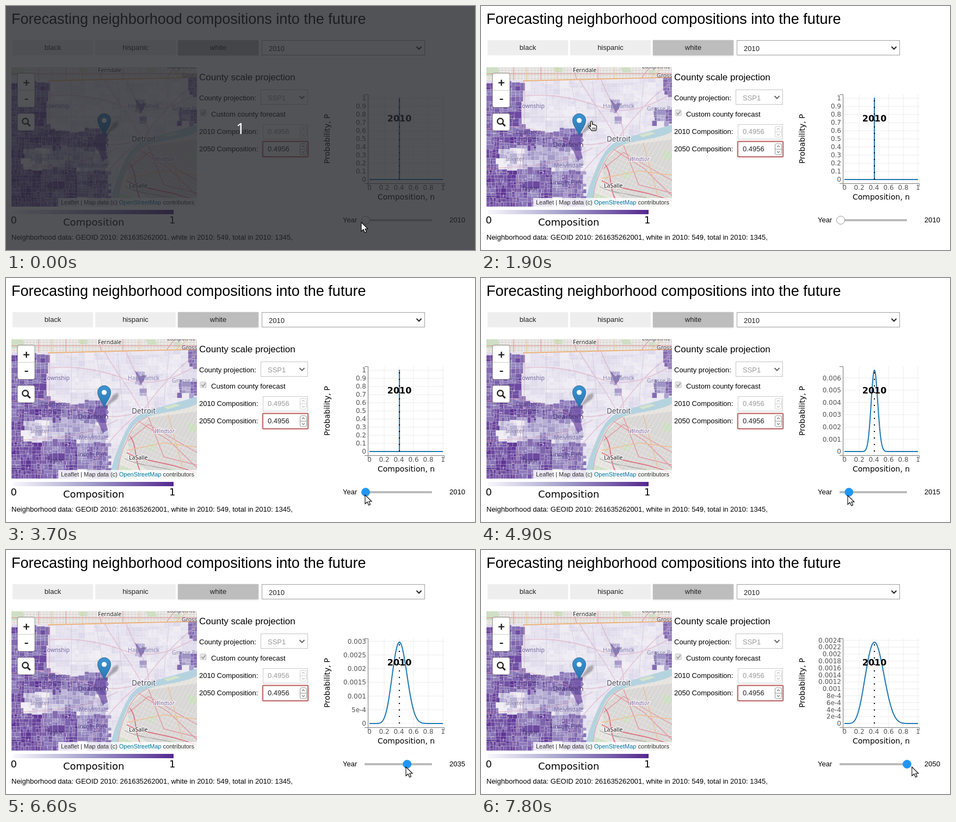
Recreate the animation shown at these times as an HTML page. Size 862 px wide and 450 px high, loop 8000 ms.

```html
<!DOCTYPE html>
<html lang="en">
<head>
<meta charset="utf-8">
<title>Forecasting neighborhood compositions</title>
<style>
html, body { margin: 0; width: 100%; height: 100%; overflow: hidden; background: #fff; }
svg { display: block; }
text { font-family: "Liberation Sans", Arial, sans-serif; font-size: 13px; white-space: pre; }
.dv { font-family: "DejaVu Sans", Verdana, sans-serif; }
.map { font-family: "Noto Sans", sans-serif; }
</style>
</head>
<body>
<svg id="stage" width="862" height="450" viewBox="0 0 862 450" xmlns="http://www.w3.org/2000/svg"></svg>
<script>
const LOOP = 8000, MODE = 549 / 1345;
let seed = 11;
const rand = () => (seed = (seed * 16807) % 2147483647) / 2147483647;
const lerp = (a, b, k) => a + (b - a) * k;

const text = (x, y, str, size = 13, fill = '#000', extra = '') =>
  `<text x="${x}" y="${y}" style="font-size:${size}px" fill="${fill}" ${extra}>${str}</text>`;
const rect = (x, y, w, h, fill, extra = '') =>
  `<rect x="${x}" y="${y}" width="${w}" height="${h}" fill="${fill}" ${extra}/>`;
const line = (d, stroke, width = 1, extra = '') =>
  `<path d="${d}" fill="none" stroke="${stroke}" stroke-width="${width}" ${extra}/>`;
const shape = (d, fill, extra = '') => `<path d="${d}" fill="${fill}" ${extra}/>`;
const chevron = (x, y, color) => line(`M${x - 4.5} ${y - 2}l4.5 4.5 4.5-4.5`, color, 2);

// Map ------------------------------------------------------------
const COUNTY = 'M10 137H78L351 131V219L300 234 252 249 228 268 213 295 199 328 192 370H10Z';
const RAMP = [[242, 239, 247], [152, 141, 196], [84, 39, 143]];
function purple(v) {
  const k = Math.max(0, Math.min(1, v)) * 2, i = k < 1 ? 0 : 1;
  return `rgb(${RAMP[i].map((c, j) => Math.round(lerp(c, RAMP[i + 1][j], k - i)))})`;
}

// x0, y0, x1, y1, share
const ZONES = [
  [34, 264, 77, 300, .18], [10, 137, 78, 240, .74], [10, 240, 64, 369, .8],
  [64, 232, 142, 262, .66], [64, 300, 130, 369, .72], [64, 262, 140, 300, .42],
  [142, 225, 186, 268, .64], [140, 268, 186, 302, .3], [130, 302, 190, 352, .64],
  [150, 350, 200, 369, .58], [235, 172, 257, 195, .36], [318, 186, 351, 218, .6],
  [336, 132, 351, 165, .5], [244, 205, 262, 217, .26]
];
const share = (x, y) => (ZONES.find(z => x >= z[0] && y >= z[1] && x < z[2] && y < z[3]) || [.06])
  .at(-1);

function blocks(x, y, w, h, bias = 0) {
  const big = Math.max(w, h);
  if (big < 34 && big > 17) bias = rand() - .5;
  if (big < 9 || (big < 16 && rand() < .3)) {
    const s = share(x + w / 2, y + h / 2);
    const v = s + (bias * .32 + (rand() - .5) * .24) * (s > .1 ? 1 : .25);
    return rect(x.toFixed(1), y.toFixed(1), w.toFixed(1), h.toFixed(1), purple(v));
  }
  const k = .38 + rand() * .24;
  return w > h
    ? blocks(x, y, w * k, h, bias) + blocks(x + w * k, y, w * (1 - k), h, bias)
    : blocks(x, y, w, h * k, bias) + blocks(x, y + h * k, w, h * (1 - k), bias);
}

function streets() {
  let north = '', south = '', dashes = '';
  for (let x = 12; x < 351; x += 6) north += `M${x} 113v24`;
  for (let y = 116; y < 137; y += 5) north += `M10 ${y}h341`;
  for (let i = 0; i < 22; i++) {
    south += `M${200 + i * 8} 369l70 -130M195 ${235 + i * 9}l170 78`;
  }
  for (let i = 0; i < 260; i++) {
    const x = 10 + rand() * 180, y = 138 + rand() * 230;
    if (share(x, y) > .5) dashes += `M${x.toFixed(1)} ${y.toFixed(1)}${rand() < .5 ? 'h' : 'v'}${(2 + rand() * 5).toFixed(1)}`;
  }
  return { north, south, dashes };
}

function map() {
  const { north, south, dashes } = streets();
  const river = 'M351 219C320 228 285 237 255 247 233 256 223 275 214 295 205 317 195 338 191 369H205C205 342 212 318 220 300 227 279 238 263 260 256 292 246 328 245 351 232Z';
  const highways = 'M250 247C230 205 190 160 170 113M10 227C60 215 100 226 150 246 190 262 215 255 250 247M250 247C275 210 315 165 351 140M215 113C222 160 262 200 262 240M78 166C140 160 190 175 230 190 270 198 310 188 351 160M150 369C165 330 195 290 240 252M78 137C84 190 78 260 62 369M10 300C80 295 130 300 205 262';
  const label = (x, y, s, size = 10.5, fill = '#7468a4', extra = '') =>
    text(x, y, s, size, fill, `class="map" ${extra}`);
  const halo = 'stroke="#fff" stroke-width="2.5" stroke-opacity=".75" paint-order="stroke"';
  return `<g clip-path="url(#mapBox)">
    ${rect(10, 113, 341, 257, '#e6e3df')}
    ${rect(10, 113, 341, 25, '#dedbd8')}
    ${line(north, '#fff', 1, 'opacity=".6"')}
    ${shape('M10 113h20l4 9-16 8H10ZM132 113h18v9h-14ZM256 113h18l3 10h-16ZM309 118h11v9h-11Z', '#cfdfc4')}
    ${shape('M222 290L262 258 351 246V358L262 356 228 332Z', '#d9d7d5')}
    ${shape('M208 345l26 9 8 16H206ZM300 350l26 6-4 14h-34ZM264 304l10 4-5 12-9-5ZM334 266l17 5v12h-16Z', '#cddfc2')}
    ${line(south, '#fff', .7, 'opacity=".45"')}
    ${line('M225 300L262 270 351 322M240 262L300 300 351 350M262 257L290 330 351 345', '#e4959f', 1.4)}
    ${line('M228 292C244 312 232 344 256 369M222 322C250 340 292 336 351 360', '#dd6f80', 1.8)}
    ${line('M222 318L290 304 351 312M298 252L330 369', '#eebd92', 1.3)}
    ${line('M218 333C250 350 290 344 351 369', '#a5a2a2', 1.1)}
    ${line('M60 113v24M110 113v24M170 113l6 24M215 113v24M310 113l-18 24M10 125h341', '#e0a3a6', 1.3)}
    ${line('M84 113v24M140 113v24M245 113v24M335 113l-28 24', '#eec797', 1.3)}
    <g clip-path="url(#county)">
      <g opacity=".92" stroke="#fff" stroke-opacity=".35" stroke-width=".5">${blocks(10, 130, 341, 240)}</g>
      ${line(dashes, '#f1ebf5', .9, 'opacity=".7"')}
      ${line(highways, '#dba0ba', 1.6, 'opacity=".5"')}
      ${line('M120 137v100M165 137l14 75M205 137l10 110M300 133l-10 96M78 205h145', '#d3c9da', 1, 'opacity=".8"')}
      ${shape('M165 238l17-4 7 14-8 10 6 22-9 6-9-20-8-12Z', '#5d399a', 'opacity=".6"')}
      ${shape('M236 170l11 11 12-2-11 18Z', '#69509f', 'opacity=".6"')}
      ${label(28, 188, 'Redford Township')}
      ${label(224, 188, 'Hamtramck', 10.5, '#8f86b0')}
      ${label(305, 193, 'Grosse Pointe', 10.5, '#8f86b0')}
      ${label(64, 236, 'Dearborn', 10.5, '#54428a')}${label(69, 249, 'Heights', 10.5, '#54428a')}
      ${label(132, 260, 'Dearborn', 12.5, '#4d3d7c')}
      ${label(45, 286, 'Inkster', 10.5, '#9088ac')}
      ${label(134, 298, 'Melvindale', 10.5, '#7d71a8')}
      ${label(127, 329, 'Lincoln Park', 10.5, '#54428a')}
      ${label(75, 340, 'Taylor', 10.5, '#453373')}
      ${label(8, 356, 'us', 10.5, '#453373')}
    </g>
    ${shape(river, '#b4d3df')}
    ${shape('M290 238l22-6 9 3-24 7Z', '#d5e3cc')}
    ${line('M205 369C206 340 213 318 222 301 229 280 240 264 261 256', '#d9a5b1', 1.3)}
    ${line('M78 138L351 131.5', '#ecb27a', 1.8)}
    ${label(169, 122, 'Ferndale', 10.5, '#222', halo)}
    ${label(296, 115, 'Eastpointe', 10.5, '#444')}
    ${label(323, 132, 'Grosse', 10.5, '#58506e')}
    ${label(231, 250, 'Detroit', 13.5, '#4b4b5c', halo)}
    ${label(273, 286, 'Windsor', 10, '#7c6699', halo + ' font-style="italic"')}
    ${label(226, 335, 'LaSalle', 10.5, '#222', halo)}
    ${rect(96, 354, 255, 16, '#fff', 'opacity=".8"')}
    ${text(101, 366, 'Leaflet | Map data (c) <tspan fill="#0078a8">OpenStreetMap</tspan> contributors', 11, '#333')}
  </g>`;
}

const mapControls = () => `
  ${rect(21, 124, 32, 63, '#fff', 'rx="4" stroke="#000" stroke-opacity=".22" stroke-width="2"')}
  ${line('M22 155.5H52', '#ccc')}
  ${line('M32 141.5h11M37.5 136v11M34.5 172h6', '#111', 2.2)}
  ${rect(21, 198, 32, 32, '#fff', 'rx="4" stroke="#000" stroke-opacity=".22" stroke-width="2"')}
  <circle cx="35.5" cy="212.5" r="5.3" fill="none" stroke="#222" stroke-width="2.4"/>
  ${line('M39.5 216.5l5 5', '#222', 3)}
  ${shape('M181 239L197 216q9-7 10 0 0 5-7 10Z', '#000', 'opacity=".28" filter="url(#soft)"')}
  ${shape('M180.5 239C178 230 168.5 221 168.5 210.5A12 12 0 0 1 192.5 210.5C192.5 221 183 230 180.5 239Z', 'url(#pin)', 'stroke="#2e6c97"')}
  <circle cx="180.5" cy="211" r="4.6" fill="#fff"/>`;

// Form -----------------------------------------------------------
const button = (x, label, mid) =>
  rect(x, 63, 148, 28, '#eee') + text(mid, 81, label, 13, '#222', 'text-anchor="middle"');

function spinner(y, color) {
  return rect(540.5, y - 10, 12, 20, '#fff', `rx="3" stroke="${color}" stroke-width=".8"`) +
    line(`M540.5 ${y}h12`, color, .8) +
    line(`M544 ${y - 4}l2.5-2.5 2.5 2.5M544 ${y + 4}l2.5 2.5 2.5-2.5`, color, 1.2);
}

const form = () => `
  ${text(10, 33, 'Forecasting neighborhood compositions into the future', 27)}
  ${button(12, 'black', 86)}${button(164, 'hispanic', 238)}
  ${rect(316, 63.5, 148, 28, '#000', 'opacity=".2" filter="url(#soft)"')}
  ${rect(316, 63, 148, 28, '#bdbdbd')}
  ${text(390, 81, 'white', 13, '#222', 'text-anchor="middle"')}
  ${rect(470.5, 63.5, 299, 27, '#fff', 'stroke="#9e9e9e"')}
  ${text(483, 83, '2010', 13, '#222')}${chevron(759, 77, '#222')}
  ${text(355, 137, 'County scale projection', 17)}
  ${text(355, 174, 'County projection:')}
  ${rect(468.5, 154.5, 86, 27, '#fff', 'stroke="#c4c4c4"')}
  ${text(481, 174, 'SSP1', 13, '#999')}${chevron(544, 168, '#666')}
  ${rect(357, 191.5, 11, 11, '#e6e6e6', 'rx="2" stroke="#c6c6c6"')}
  ${line('M359.5 197l2.5 3 4.5-6', '#999', 1.8)}
  ${text(377, 204, 'Custom county forecast')}
  ${text(355, 236, '2010 Composition:')}
  ${rect(472.5, 218.5, 82, 27, '#fff', 'stroke="#ccc"')}
  ${text(481, 236, '0.4956', 13, '#999')}${spinner(232, '#c2c2c2')}
  ${text(355, 268, '2050 Composition:')}
  ${rect(471.5, 249.5, 84, 29, '#fff', 'rx="2" stroke="#d98583" stroke-width="2"')}
  ${rect(472.5, 250.5, 82, 27, 'none', 'stroke="#a86765"')}
  ${text(481, 268, '0.4956', 13, '#222')}${spinner(264, '#777')}
  ${rect(13, 376, 295, 8, 'url(#bar)')}
  ${text(8.5, 401, '0', 18, '#000', 'class="dv"')}${text(300, 401, '1', 18, '#000', 'class="dv"')}
  ${text(105, 405, 'Composition', 18, '#000', 'class="dv"')}
  ${text(10, 431, 'Neighborhood data: GEOID 2010: 261635262001, white in 2010: 549, total in 2010: 1345,')}
  ${text(619, 399, 'Year')}
  ${rect(659, 393, 124, 4, '#bbb', 'rx="1"')}`;

// Chart ----------------------------------------------------------
const px = v => 668 + 135 * v;

function tickStep(peak) {
  const rough = peak * 1.093 / 13.5, base = 10 ** Math.floor(Math.log10(rough));
  return base * [1, 2, 5, 10].find(m => base * m >= rough);
}

function tickLabel(v) {
  if (v === 0) return '0';
  return v < .00099 ? `${Math.round(v * 1e4)}e-4` : String(+v.toFixed(4));
}

function curve(years) {
  if (!years) return `M668 320H${px(MODE)}V170V320H803`;
  const k = MODE * (1 - MODE) / (.0004 * years);
  let d = `M${px(0)} 320`;
  for (let i = 1; i < 200; i++) {
    const x = i / 200;
    const p = Math.exp(k * (MODE * Math.log(x / MODE) + (1 - MODE) * Math.log((1 - x) / (1 - MODE))));
    d += `L${px(x).toFixed(2)} ${(320 - 150 * p).toFixed(2)}`;
  }
  return d + `L${px(1)} 320`;
}

function chart(years) {
  const peak = years ? 1 / (1345 * Math.sqrt(.0004 * years * 2 * Math.PI)) : 1;
  const step = tickStep(peak);
  let grid = '', labels = '';
  for (let i = 0; i * step <= peak * 1.047; i++) {
    const y = 320 - 150 * i * step / peak;
    grid += `M666 ${y.toFixed(1)}H806`;
    labels += text(662, (y + 4.22).toFixed(2), tickLabel(i * step), 12, '#555', 'class="dv" text-anchor="end"');
  }
  for (let i = 0; i <= 5; i++) {
    grid += `M${px(i / 5)} 163V328`;
    labels += text(px(i / 5), 339, i / 5, 12, '#555', 'class="dv" text-anchor="middle"');
  }
  return line(grid, '#ececec') + labels +
    line('M659 163.5H665.5V327.5H659M665.5 333V327.5H805.5V333', '#777') +
    line(curve(years), '#1f77b4', 2, 'stroke-linejoin="round"') +
    line(`M${px(MODE)} 320V170`, '#000', 2, 'stroke-dasharray="2 10"') +
    text(px(MODE), 213, '2010', 16, '#000', 'class="dv" font-weight="bold" text-anchor="middle"') +
    text(683, 357, 'Composition, n', 14, '#000', 'class="dv"') +
    text(0, 0, 'Probability, P', 14, '#000', 'class="dv" text-anchor="middle" transform="translate(595 245) rotate(-90)"');
}

// Scene ----------------------------------------------------------
const stage = document.getElementById('stage');
stage.innerHTML = `
  <defs>
    <clipPath id="mapBox"><rect x="10" y="113" width="341" height="257"/></clipPath>
    <clipPath id="county"><path d="${COUNTY}"/></clipPath>
    <filter id="soft" x="-20%" y="-30%" width="140%" height="160%"><feGaussianBlur stdDeviation="1.5"/></filter>
    <linearGradient id="bar">
      <stop stop-color="#f8f7fb"/><stop offset=".5" stop-color="#9e9ac8"/><stop offset="1" stop-color="#54278f"/>
    </linearGradient>
    <linearGradient id="pin" x2="0" y2="1"><stop stop-color="#3d94d2"/><stop offset="1" stop-color="#2775b0"/></linearGradient>
  </defs>
  ${rect(0, 0, 862, 450, '#fff')}
  ${map()}${mapControls()}${form()}
  <g id="chart"></g>
  <circle id="knob" cy="395" r="7.5"/>
  <text id="year" x="815" y="399">2010</text>
  <g id="shade">
    ${rect(0, 0, 862, 450, '#24262b', 'opacity=".79"')}
    ${text(431, 236, '1', 28, '#fff', 'class="map" text-anchor="middle"')}
  </g>
  <path id="arrow" d="M0 0V16.5L4 13 6.7 19 9.5 17.8 6.9 12H12Z" fill="#fff" stroke="#000" stroke-width="1.1"/>
  <g id="hand">
    <path d="M4.5 9V2.2q0-1.7 1.5-1.7t1.5 1.7V6.5q2.4-.8 2.8.7 2.2-.7 2.6.9 2.5-.4 2.5 1.6v3.8q0 2-1.5 4.4H6.2Q4 14 1.4 11.5.3 9.6 1.9 8.8q1.4 0 2.6 2Z" fill="#fff" stroke="#000" stroke-width="1.1"/>
    <path d="M8 12v4M10.3 12v4M12.6 12v4" stroke="#000" stroke-width=".9"/>
  </g>`;
const [chartEl, knob, yearEl, shade, arrow, hand] =
  ['chart', 'knob', 'year', 'shade', 'arrow', 'hand'].map(id => document.getElementById(id));

// time, x, y, glide (1 = move evenly towards the next stop)
const PATH = [
  [0, 653, 399, 0], [800, 656, 399, 0], [1100, 480, 350, 0], [1200, 306, 306, 0],
  [1400, 228, 231, 0], [1600, 207, 215, 0], [1900, 197, 212, 0], [2200, 197, 212, 1],
  [2900, 643, 401, 0], [3100, 650, 401, 0], [3200, 655, 400, 0], [3600, 658, 400, 0],
  [3700, 660, 400, 0], [4500, 660, 400, 1], [4900, 674, 401, 1], [5400, 690, 401, 1],
  [6200, 722, 401, 0], [6300, 722, 401, 1], [6600, 735, 400, 1], [7200, 772, 400, 1],
  [7400, 792, 400, 0]
];

function pointer(t) {
  const i = PATH.findLastIndex(p => p[0] <= t), a = PATH[i], b = PATH[i + 1];
  if (!a[3]) return [a[1], a[2]];
  const k = (t - a[0]) / (b[0] - a[0]);
  return [lerp(a[1], b[1], k), lerp(a[2], b[2], k)];
}

let shownYears = -1;
function draw(time) {
  const t = Math.floor((time % LOOP) / 100) * 100;
  const [x, y] = pointer(t);
  const pressed = t >= 3600, overMap = x < 351;
  const stop = pressed ? Math.max(0, Math.min(8, Math.round((x - 661) / 15.25))) : 0;
  const years = stop * 5;
  if (years !== shownYears) {
    shownYears = years;
    chartEl.innerHTML = chart(years);
    yearEl.textContent = 2010 + years;
    knob.setAttribute('cx', 661 + stop * 15.25);
  }
  knob.setAttribute('fill', pressed ? '#2196f3' : '#fff');
  knob.setAttribute('stroke', pressed ? '#2196f3' : '#999');
  shade.style.display = t < 500 ? '' : 'none';
  arrow.style.display = overMap ? 'none' : '';
  hand.style.display = overMap ? '' : 'none';
  for (const c of [arrow, hand]) c.setAttribute('transform', `translate(${x.toFixed(1)} ${y.toFixed(1)})`);
}

const start = performance.now();
function tick() {
  draw(performance.now() - start);
  requestAnimationFrame(tick);
}
tick();
</script>
</body>
</html>
```
